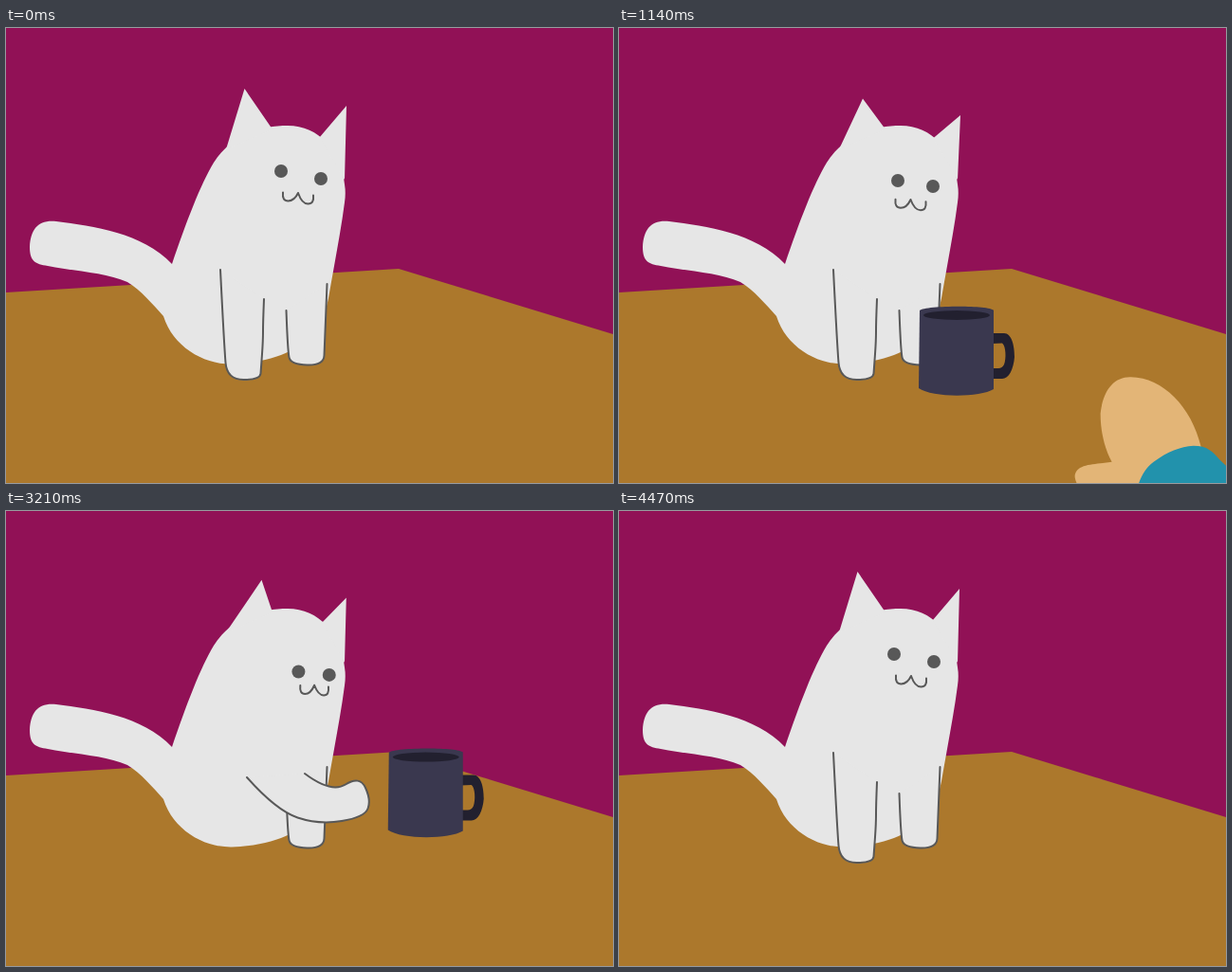
An HTML page that plays this animation: 640 by 480 pixels, repeating every 4.5 s.

```html
<!DOCTYPE html>
<html lang="en">
<head>
<meta charset="utf-8">
<title>Cat and mug</title>
<style>
  html, body { margin: 0; width: 100%; height: 100%; overflow: hidden; background: #911156; }
  svg { display: block; width: 100%; height: 100%; }
  .fur { fill: #e6e6e6; }
  .limb, .mouth { stroke: #585858; stroke-width: 2; stroke-linecap: round; stroke-linejoin: round; }
  .limb { fill: #e6e6e6; }
  .mouth { fill: none; }
  .eye { fill: #585858; }
</style>
</head>
<body>
<svg viewBox="0 0 640 480">
  <path fill="#ac782c" d="M0 279L414 254L640 323V480H0Z"/>
  <path class="fur" d="M175 249C144 216 92 209 53 204C34 202 26 212 25 231C25 246 31 249 44 251
    C75 257 105 258 128 268C142 276 156 293 166 304C176 336 208 355 238 354.5C262 354 285 348 299 341
    C325 330 336 305 340 285C346 250 353 215 357 184Q358.500 174 357 165C354 130 330 103 297 103
    C270 103 238 112 219 142C205 165 190 205 175 249Z"/>
  <path id="ears" class="fur"/>
  <circle id="eyeLeft" class="eye" r="7"/>
  <circle id="eyeRight" class="eye" r="7"/>
  <path id="mouth" class="mouth"/>
  <path id="leg" class="limb"/>
  <g id="mug">
    <path fill="#22202f" fill-rule="evenodd" d="M393 322H406C414 322 417 335 417 347C416 360 411 370 404 370H393Z
      M393 333L404 332.500C408 335 408.500 349 406 355Q404 359 400 359H393Z"/>
    <path fill="#3a384f" d="M317 298C322 293 390 292 395 298V381C380 390 330 390 316 380Z"/>
    <ellipse fill="#22202f" cx="356" cy="303" rx="35" ry="5"/>
  </g>
  <path id="arm" class="limb"/>
  <g id="hand">
    <path fill="#e3b577" d="M396 372C388 357 384 339 384 321C387 294 400 282 416 282.500C450 283 480 314 490 356
      L470 400L422 419C390 416 360 409 357 388C357 373 380 375 396 372Z"/>
    <path fill="#2292ac" d="M422 417C420 399 428 381 440 372C455 361 468 356 482 355C497 355 502 361 510 370
      C535 394 560 416 590 436L730 540L600 600L457 459C445 446 427 435 422 417Z"/>
  </g>
</svg>
<script>
const LOOP = 4500;
const el = id => document.getElementById(id);
const mix = (a, b, k) => a.map((v, i) => v + (b[i] - v) * k);
const ease = k => k < 0.5 ? 2 * k * k : 1 - 2 * (1 - k) ** 2;
const progress = (t, start, end) => Math.min(1, Math.max(0, (t - start) / (end - start)));

// Each move is [start, end, pose].
const track = (first, moves) => t =>
  moves.reduce((pose, [start, end, next]) => mix(pose, next, ease(progress(t, start, end))), first);

// Smooth line guided by the corners of a polygon.
function smooth(p) {
  let d = `M${p[0]} ${p[1]}`;
  for (let i = 2; i < p.length - 4; i += 2) {
    d += `Q${p[i]} ${p[i + 1]} ${(p[i] + p[i + 2]) / 2} ${(p[i + 1] + p[i + 3]) / 2}`;
  }
  return d + `Q${p.slice(-4)}`;
}

// Left tip, right tip.
const ears = {
  rest: [251.5, 64, 359, 82],
  look: [257, 74.5, 360, 92],
  glance: [250, 76, 359.5, 91],
  push: [298.5, 69, 356, 90]
};

// Eye centre x, y, half gap, tilt; mouth x, y, half width.
const face = {
  rest: [311, 155, 21, 4, 308, 174, 16],
  look: [312.5, 164, 18.5, 3, 307.5, 181, 16],
  glance: [305, 162.5, 20, 2.5, 302, 179.5, 16],
  aim: [313.3, 171.5, 20.7, 2, 312.5, 182, 16],
  push: [332.5, 171, 13, 1.5, 334, 185, 14]
};

// Guide points from the outer shoulder around the paw and back.
const arm = {
  down: [226, 255, 230, 335, 233, 371, 268, 371, 269, 358, 271, 330, 271, 310, 272, 286],
  hit: [254, 281, 285, 316, 330, 331, 378, 323, 385, 305, 373, 279, 343, 298, 315, 277],
  raised: [257, 280, 285, 305, 325, 316, 381, 308, 390, 292, 378, 263, 349, 283, 317, 264]
};

const earsAt = track(ears.rest, [
  [480, 960, ears.look], [1480, 1815, ears.glance], [2140, 2500, ears.look],
  [3145, 3315, ears.push], [4050, 4470, ears.rest]
]);
const faceAt = track(face.rest, [
  [390, 870, face.look], [1480, 1815, face.glance], [2140, 2500, face.aim],
  [3110, 3295, face.push], [4110, 4470, face.rest]
]);
const armAt = track(arm.down, [
  [2530, 2770, mix(arm.down, arm.hit, 0.68)], [3110, 3210, arm.hit],
  [3210, 3640, arm.raised], [3720, 4200, arm.down]
]);
const mugAt = track([330, 139], [[0, 870, [0, 0]], [3120, 3371, [330, -165]]]);
const handAt = track([330, 139], [[0, 870, [0, 0]], [900, 1422, [290, 201]]]);

const move = (id, x, y) => el(id).setAttribute('transform', `translate(${x} ${y})`);
const shape = (id, d) => el(id).setAttribute('d', d);

function drawEars([lx, ly, rx, ry]) {
  const slide = (lx - ears.rest[0]) * 0.15;
  shape('ears', `M232 128L${lx} ${ly}L${Math.max(281, lx)} 107Z
    M${330.5 + slide} ${115.5 + slide * 0.85}L${rx} ${ry}L357 160Z`);
}

function drawFace([x, y, gap, tilt, mx, my, width]) {
  move('eyeLeft', x - gap, y - tilt);
  move('eyeRight', x + gap, y + tilt);
  const half = side => {
    const endX = mx + side * width, endY = my + 1 + side * tilt * 0.4, dip = endY + 9;
    return smooth([endX, endY, endX + side, dip, mx + side * 4, dip, mx, my]);
  };
  shape('mouth', half(-1) + half(1));
}

function frame() {
  const t = performance.now() % LOOP;
  drawEars(earsAt(t));
  drawFace(faceAt(t));
  shape('arm', smooth(armAt(t)));
  move('mug', ...mugAt(t));
  move('hand', ...handAt(t));
  requestAnimationFrame(frame);
}

shape('leg', smooth([295.5, 298, 297, 340, 300, 355, 335, 356, 336, 335, 338.5, 270]));
frame();
</script>
</body>
</html>
```
